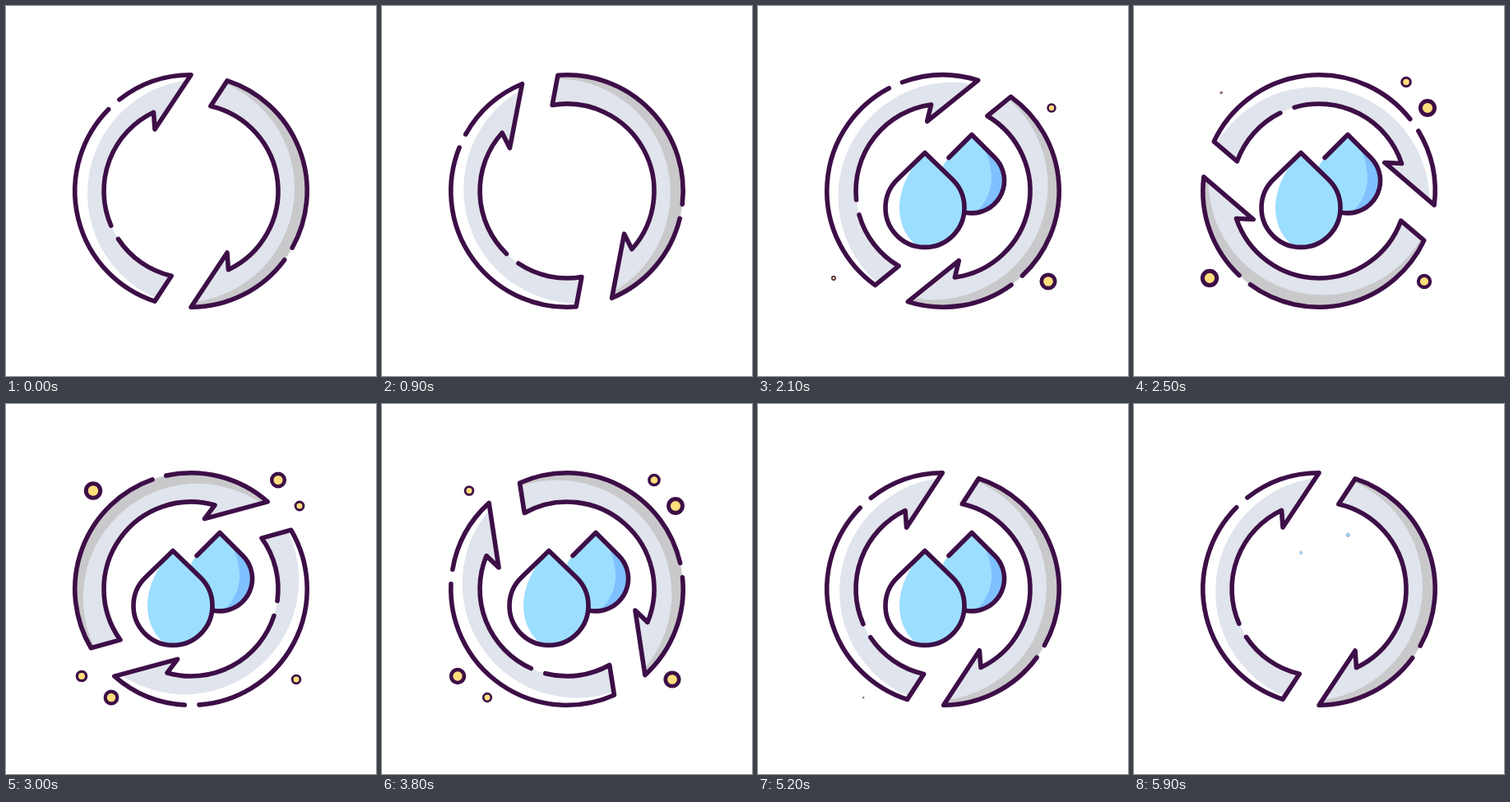
These frames come from a looping animation (450 px wide and 450 px high, 6 s). An HTML page:

```html
<!DOCTYPE html>
<html lang="en">
<head>
<meta charset="utf-8">
<title>Water cycle</title>
<style>
  html, body { margin: 0; width: 100%; height: 100%; overflow: hidden; background: #fff; }
  svg { display: block; width: 100vw; height: 100vh; }
  .line { fill: none; stroke: #3d0e47; stroke-width: 5.6; stroke-linecap: round; stroke-linejoin: round; }
  #dots .line { fill: #ffde7c; stroke-width: 5; }
</style>
</head>
<body>
<svg viewBox="0 0 450 450">
  <defs>
    <clipPath id="ring"><path id="ringShape"/></clipPath>
    <clipPath id="frontClip"><path d="M0 0L33.5 32.5A48 48 0 1 1 -33.5 32.5Z"/></clipPath>
    <clipPath id="backClip"><path d="M0 0L28 28A39.5 39.5 0 1 1 -28 28Z"/></clipPath>
  </defs>

  <g id="arrows">
    <g>
      <g clip-path="url(#ring)">
        <circle r="150" fill="#fff"/>
        <circle cx="13" cy="3" r="139" fill="#e0e4ec"/>
      </g>
      <path id="lineA" class="line"/>
    </g>
    <g transform="rotate(180)">
      <g clip-path="url(#ring)">
        <circle r="150" fill="#c9c9cb"/>
        <circle cx="13" cy="3" r="139" fill="#e0e4ec"/>
      </g>
      <path id="lineB" class="line"/>
    </g>
  </g>

  <g id="back">
    <g clip-path="url(#backClip)">
      <rect x="-50" y="-5" width="100" height="110" fill="#9cdeff"/>
      <path d="M6 2C30 35 32 75 0 98H60V0Z" fill="#7fc0ff"/>
    </g>
    <path class="line" d="M-28 28L0 0L28 28A39.5 39.5 0 1 1 -38.2 46"/>
  </g>
  <g id="front">
    <g clip-path="url(#frontClip)">
      <rect x="-60" y="-5" width="120" height="130" fill="#fff"/>
      <path d="M2 -3C-42 42 -40 95 -4 117H60V-5Z" fill="#9cdeff"/>
    </g>
    <path class="line" d="M0 0L33.5 32.5A48 48 0 1 1 -33.5 32.5Z"/>
  </g>

  <g id="dots"></g>
</svg>
<script>
const LOOP = 6000, STEP = 100;
const OUTER = 141.2, INNER = 106;
const $ = id => document.getElementById(id);

// Arrow outline, centred on the ring
const polar = (r, deg) => {
  const a = deg * Math.PI / 180;
  return `${(r * Math.cos(a)).toFixed(2)} ${(r * Math.sin(a)).toFixed(2)}`;
};
const arc = (r, deg, sweep) => `A${r} ${r} 0 0 ${sweep} ${polar(r, deg)}`;
const head = `${arc(OUTER, -90, 1)}L-44 -75L${polar(INNER, -115.4)}`;
const tail = `${arc(INNER, 103, 0)}L${polar(OUTER, 108.2)}`;

$('ringShape').setAttribute('d', `M${polar(OUTER, -140)}${head}${tail}${arc(OUTER, -140, 1)}Z`);
$('lineA').setAttribute('d',
  `M${polar(OUTER, -128.1)}${head}${arc(INNER, 156.6, 0)}` +
  `M${polar(INNER, 146.6)}${tail}${arc(OUTER, -135.3, 1)}`);
$('lineB').setAttribute('d',
  `M${polar(OUTER, -143.6)}${head}${tail}${arc(OUTER, -150.7, 1)}`);

// Easing
const clamp = v => Math.min(1, Math.max(0, v));
const sine = p => 0.5 - 0.5 * Math.cos(Math.PI * p);
const bezier = (x1, y1, x2, y2) => {
  const at = (s, a, b) => 3 * s * (1 - s) ** 2 * a + 3 * s * s * (1 - s) * b + s ** 3;
  return x => {
    let lo = 0, hi = 1;
    for (let i = 0; i < 24; i++) {
      const mid = (lo + hi) / 2;
      if (at(mid, x1, x2) < x) lo = mid; else hi = mid;
    }
    return at((lo + hi) / 2, y1, y2);
  };
};
const track = (keys, t) => {
  if (t <= keys[0][0]) return keys[0][1];
  for (let i = 1; i < keys.length; i++) {
    const [t0, v0] = keys[i - 1], [t1, v1] = keys[i];
    if (t < t1) return v0 + (v1 - v0) * sine((t - t0) / (t1 - t0));
  }
  return keys[keys.length - 1][1];
};

const spin = bezier(0.65, -0.402, 0.262, 1);
const spinStart = 200, spinTime = 5153;

const grow = [[1000, 0], [1840, 1], [5200, 1], [6000, 0]];
const drops = [
  { el: $('back'), x: 260, y: 156.5, start: 20 },
  { el: $('front'), x: 203, y: 178.5, start: 0 }
];

// x, y, start time
const pulse = [[0, 0], [650, 1], [1350, 0.54], [2150, 1], [2820, 0]];
const dots = [
  [353, 335, 1550], [357, 124, 1770], [92, 331, 1880],
  [331, 92.5, 2130], [106, 105.5, 2340], [128, 357, 2520]
].map(([x, y, start]) => {
  const el = document.createElementNS('http://www.w3.org/2000/svg', 'circle');
  el.setAttribute('r', 8.7);
  el.setAttribute('class', 'line');
  $('dots').append(el);
  return { el, x, y, start };
});

const place = ({ el, x, y, start }, keys, t) => {
  const scale = track(keys, t - start);
  el.setAttribute('visibility', scale > 0.005 ? 'visible' : 'hidden');
  el.setAttribute('transform', `translate(${x} ${y}) scale(${Math.max(scale, 0.001)})`);
};

function draw(t) {
  const turn = 360 * spin(clamp((t - spinStart) / spinTime));
  $('arrows').setAttribute('transform', `translate(225 225) rotate(${turn.toFixed(3)})`);
  for (const d of drops) place(d, grow, t);
  for (const d of dots) place(d, pulse, t);
}

const begin = performance.now();
function tick() {
  const t = (performance.now() - begin) % LOOP;
  draw(Math.floor(t / STEP) * STEP);
  requestAnimationFrame(tick);
}
tick();
</script>
</body>
</html>
```
